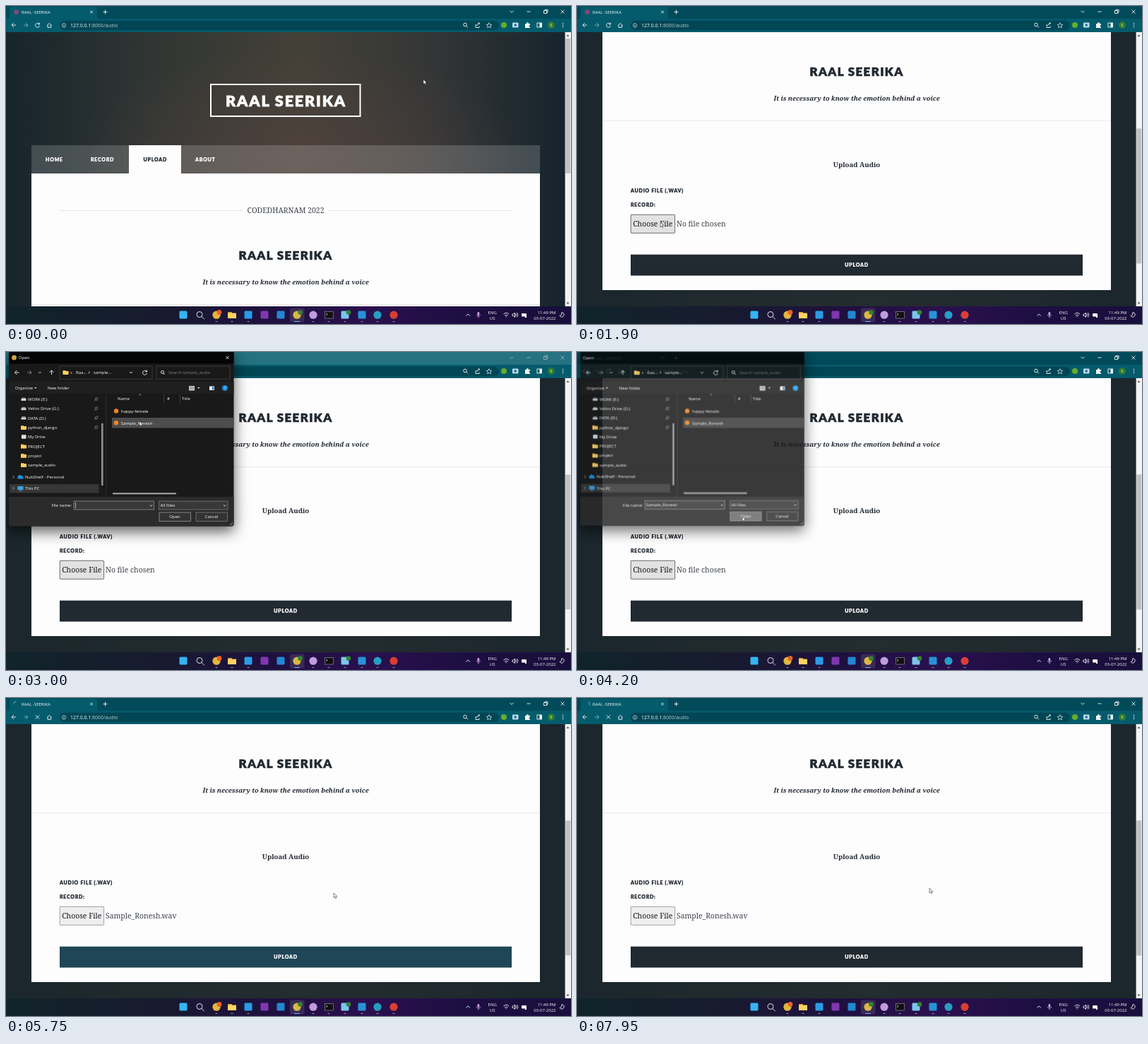
These frames come from a looping animation (800x450 px, 8000 ms). An HTML page:

```html
<!DOCTYPE html>
<html lang="en">
<head>
<meta charset="utf-8">
<title>Audio upload</title>
<style>
html, body { margin: 0; width: 100%; height: 100%; overflow: hidden; background: #1c272d; }
svg { display: block; width: 800px; height: 450px; }
text { white-space: pre; }
.ui { font: 6px "Open Sans", "Noto Sans", sans-serif; fill: #fff; }
.url { font-size: 6.9px; }
.cap, .h0, .h1 { font: 900 7px Lato, sans-serif; fill: #212931; stroke: #212931; stroke-width: .035em; }
.cap { letter-spacing: .75px; }
.h0 { font-size: 21.5px; letter-spacing: 1.9px; }
.h1 { font-size: 16.9px; letter-spacing: 1.4px; }
.white { fill: #fff; stroke: #fff; }
.body { font: 300 10.4px "Noto Serif", serif; fill: #3c434a; }
.bold { font: 700 9.7px "Noto Serif", serif; fill: #212931; }
.slant { font: italic 700 9.22px "Noto Serif", serif; fill: #212931; }
.mid { text-anchor: middle; }
.end { text-anchor: end; }
.line { fill: none; stroke: #f4f8f8; stroke-width: .9; }
.dim { opacity: .45; }
#dialog { transform-origin: 163px 60px; filter: drop-shadow(0 7px 10px rgba(0,0,0,.65)); }
#spinner { transform-origin: 14.5px 8.5px; }
</style>
</head>
<body>
<svg id="stage" viewBox="0 0 800 450"></svg>
<script>
const LOOP = 8000;
const stage = document.getElementById('stage');

const rect = (x, y, w, h, fill, more = '') =>
  `<rect x="${x}" y="${y}" width="${w}" height="${h}" fill="${fill}" ${more}/>`;
const dot = (x, y, r, fill, more = '') =>
  `<circle cx="${x}" cy="${y}" r="${r}" fill="${fill}" ${more}/>`;
const text = (x, y, str, cls = 'ui', more = '') =>
  `<text x="${x}" y="${y}" class="${cls}" ${more}>${str}</text>`;
const path = (d, more = '') => `<path class="line" d="${d}" ${more}/>`;
const group = (id, inner, more = '') => `<g id="${id}" ${more}>${inner}</g>`;
const cross = (x, y, r) => path(`M${x - r} ${y - r}l${2 * r} ${2 * r}m0 ${-2 * r}l${-2 * r} ${2 * r}`);
const chevron = (x, y, r = 2) => path(`M${x - r} ${y - r / 2}l${r} ${r}l${r} ${-r}`);
const arrow = (x, y, dir, more) => path(`M${x - 3} ${y}h6M${x + 3 * dir} ${y}l${-3 * dir} -3m${3 * dir} 3l${-3 * dir} 3`, more);
const lens = (x, y, r) => dot(x, y, r, 'none', 'class="line"') + path(`M${x + r * .7} ${y + r * .7}l${r} ${r}`);
const reload = (x, y) => path(`M${x + 2.5} ${y - 1.5}A3 3 0 1 0 ${x + 3} ${y + 1}M${x + 3} ${y - 3.4}v2.4h-2.4`);
const folder = (x, y, s = 1) =>
  rect(x - 4 * s, y - 3 * s, 4 * s, 3 * s, '#e3a22c', 'rx=".5"') + rect(x - 4 * s, y - 2 * s, 8 * s, 5 * s, '#ffd262', 'rx=".6"');

function background() {
  return `<defs>
    <linearGradient id="base"><stop stop-color="#17242b"/><stop offset=".25" stop-color="#303533"/>
      <stop offset=".52" stop-color="#434037"/><stop offset=".75" stop-color="#343636"/><stop offset="1" stop-color="#15232c"/></linearGradient>
    <radialGradient id="warm" cx=".52" cy=".45" r=".4"><stop stop-color="#54423f" stop-opacity=".65"/>
      <stop offset="1" stop-color="#54423f" stop-opacity="0"/></radialGradient>
    <linearGradient id="bar"><stop stop-color="#10242a"/><stop offset=".25" stop-color="#171b2e"/>
      <stop offset=".48" stop-color="#1f1040"/><stop offset=".64" stop-color="#2a104f"/><stop offset=".82" stop-color="#1d0e41"/><stop offset="1" stop-color="#180f3c"/></linearGradient>
    </defs>` + rect(0, 37, 800, 388, 'url(#base)') + rect(0, 37, 800, 388, 'url(#warm)')
    + group('shade', rect(0, 37, 800, 388, '#1c272d'), 'opacity="0"');
}

function page() {
  return rect(290, 111, 211.5, 45, 'none', 'stroke="#fff" stroke-width="2"')
    + text(396.5, 141.5, 'RAAL SEERIKA', 'h0 mid white')
    + rect(36, 197, 720, 40, '#fff', 'opacity=".175"') + rect(174, 197, 74, 40, '#fefdfe')
    + [[56, 'HOME'], [120, 'RECORD'], [268, 'ABOUT']].map(([x, s]) => text(x, 220, s, 'cap white')).join('')
    + text(194.5, 220, 'UPLOAD', 'cap')
    + rect(36, 237, 720, 425, '#fefdfe')
    + rect(76, 289, 260, .8, '#dcdddf') + rect(456, 289, 260, .8, '#dcdddf')
    + text(396, 292.7, 'CODEDHARNAM 2022', 'body mid')
    + text(396, 358.5, 'RAAL SEERIKA', 'h1 mid')
    + text(396, 393.8, 'It is necessary to know the emotion behind a voice', 'slant mid')
    + rect(36, 422, 720, .8, '#e4e5e6')
    + text(396, 487.5, 'Upload Audio', 'bold mid')
    + text(76, 524.2, 'AUDIO FILE (.WAV)', 'cap') + text(76, 544.2, 'RECORD:', 'cap')
    + rect(76.2, 555.3, 62.4, 26, '#efefef', 'stroke="#8a8a8a" stroke-width=".8" rx=".8" id="choose"')
    + text(107.3, 571.8, 'Choose File', 'body mid', 'style="fill:#15191d"')
    + text(141, 571.8, 'No file chosen', 'body', 'id="nofile"')
    + text(141, 571.8, 'Sample_Ronesh.wav', 'body', 'id="file" opacity="0"')
    + rect(76, 611.7, 640, 29.8, '#212931', 'id="upload"')
    + text(396, 629.2, 'UPLOAD', 'cap mid white');
}

function scrollbar() {
  return rect(791.6, 37, 8.4, 388, '#f3f3f3') + group('thumb', rect(792.2, 46, 7, 191, '#c1c1c1'))
    + '<path d="M793.5 43l2-2.4 2 2.4zM793.5 419.5l2 2.4 2-2.4z" fill="#505050"/>';
}

function browser() {
  const tools = arrow(11, 27, -1) + arrow(28, 27, 1, 'opacity=".5"')
    + group('reload', reload(44.5, 27)) + group('stop', cross(44.5, 27, 2.6), 'opacity="0"')
    + path('M58 27.5l3.3-3 3.3 3M59 27v3.3h4.6v-3.3')
    + dot(82, 27.5, 2.8, 'none', 'class="line" style="stroke-width:.6"') + path('M82 27v2M82 25.5v.6')
    + text(91, 29.8, '127.0.0.1<tspan opacity=".72">:8000/audio</tspan>', 'ui url')
    + lens(650, 26.5, 2.3) + path('M665 26v4.5h5v-2M666.5 28q.5-3.5 4-3.5m-1.5-1.5l1.7 1.5-1.7 1.5')
    + path('M684 23.7l1.1 2.5 2.7.2-2 1.8.6 2.6-2.4-1.4-2.4 1.4.6-2.6-2-1.8 2.7-.2z', 'style="stroke-width:.7"')
    + dot(705, 27, 4, '#69ad28') + rect(717, 23.5, 8.5, 7, '#b9dcef', 'rx="1"') + dot(721.2, 27, 1.8, '#27678a')
    + '<path d="M735 25h2q0-2 1.5-2t1.5 2h2v2q-1.5 0-1.5 1.3t1.5 1.3v1.4h-7z" fill="#f4f8f8"/>'
    + rect(752, 24, 6.5, 6, 'none', 'class="line"') + rect(755.5, 24, 3, 6, '#f4f8f8')
    + dot(772, 27, 5, '#347c27') + text(772, 29, 'S', 'ui mid')
    + [24.5, 27, 29.5].map(y => dot(788.5, y, .7, '#fff')).join('');
  return rect(0, 0, 800, 18.5, '#004a5a', 'id="strip"')
    + rect(0, 18, 800, 19, '#045b6c') + path('M2 18.5Q5 18 5 14V4Q5 1 8 1H126Q129 1 129 4V14Q129 18 132 18.5z', 'style="fill:#045b6c;stroke:none"')
    + dot(14.5, 8.5, 3.6, '#7d4a78', 'id="favicon"')
    + group('spinner', path('M11 8.5A3.5 3.5 0 0 1 14.5 5', 'style="stroke:#7db9d4"'), 'opacity="0"')
    + text(22, 10.8, 'RAAL -SEERIKA') + cross(121, 8.5, 1.8) + path('M137.5 8.5h6m-3-3v6')
    + group('controls', chevron(716, 8, 2.5) + path('M737.5 8h5M761.5 6.5h4v4h-4zM763 6.5v-1.3h4v4h-1.3') + cross(788, 8, 2.4))
    + rect(76, 20.8, 622, 13.4, '#014655', 'rx="6.7"') + tools;
}

function taskbar() {
  const square = (x, fill) => rect(x - 5.5, 431.5, 11, 11, fill, 'rx="1.5"');
  const round = (x, fill) => dot(x, 437.2, 5.6, fill);
  const open = [298, 320, 343, 435, 457, 480, 504, 526, 549];
  return rect(0, 425, 800, 25, 'url(#bar)')
    + rect(402, 427.5, 20.5, 20, '#fff', 'opacity=".11" rx="2"')
    + square(251, '#35b4f2') + lens(274, 436.5, 4) + round(298, '#e5b63d') + dot(302, 433.5, 3.4, '#e8612c')
    + folder(320, 437.5, 1.5) + square(343, '#2b9be6') + square(366, '#8037b0') + square(389, '#2387d1')
    + round(412, '#d9b844') + dot(416.5, 433.5, 3.3, '#348332') + round(435, '#c29adf')
    + rect(451.5, 432.5, 12, 9.5, '#101010', 'stroke="#8a8a94" stroke-width=".7"') + path('M453.5 435l1.5 1.3-1.5 1.3')
    + square(480, '#7cc5ec') + dot(485, 433.5, 3.3, '#348332') + square(504, '#2892d8') + round(526, '#259fc2') + round(549, '#d83e34')
    + open.map(x => rect(x - 1.5, 446, 3, 1, '#a0a0aa', 'rx=".5"')).join('') + rect(408, 446, 8, 1.1, '#69b7ee', 'rx=".5"')
    + path('M651.5 438.5l2.7-2.7 2.7 2.7')
    + rect(667.5, 433, 2.8, 5, '#d0a5d8', 'rx="1.4"') + path('M666 437q3 4.5 6 0M669 439.5v2', 'style="stroke:#d0a5d8"')
    + text(688.7, 435.8, 'ENG', 'ui mid') + text(688.7, 443.8, 'US', 'ui mid')
    + path('M704.5 436q3.8-3.5 7.6 0M706 438q2.3-2 4.6 0M707.5 439.7q.8-.6 1.6 0')
    + path('M717 436h1.5l2-2v6.5l-2-2h-1.5zM722 435.5q1.3 1.7 0 3.4M723.5 434q2.6 3.2 0 6.4')
    + rect(730, 435, 7, 4.5, '#fff', 'rx="1"') + rect(735, 438, 2, 3, '#fff')
    + text(778.5, 435.8, '11:49 PM', 'ui end') + text(778.5, 443.8, '03-07-2022', 'ui end')
    + path('M787 433.5a3.3 3.3 0 1 1-3 5q3.5-.5 3-5z');
}

function dialog() {
  const side = ['WORK (E:)', 'Veltro Drive (G:)', 'DATA (D:)', 'python_django', 'My Drive', 'PROJECT', 'project', 'sample_audio'];
  const rows = side.map((label, i) => {
    const y = 67 + i * 13.3;
    const icon = i < 3 ? rect(21.5, y - 1, 7, 3, '#d4d8dc', 'rx=".5"') + rect(22.5, y - 2.5, 5, 1.5, '#8d959b')
      : i === 4 ? rect(22, y - 3, 6.5, 5.5, '#d8e2ea') : folder(25, y);
    const pin = i < 4 ? path(`M125 ${y + 2.5}l1.8-1.8m-1-1.5l2.5 2.5 1.8-3-1.5-1.5z`, 'style="stroke:#c5c5c5;stroke-width:.6"') : '';
    return icon + text(31, y + 2.1, label) + pin;
  }).join('');
  const box = (x, y, w, h, fill, edge) => rect(x, y, w, h, fill, `stroke="${edge}" stroke-width=".7"`);
  return rect(4, -3, 318.5, 249.5, '#191919', 'rx="3"') + rect(4, 0, 318.5, 16.5, '#050505')
    + rect(4, 42, 318.5, 17, '#1f1f1f')
    + group('badges', dot(11.5, 8, 3.4, '#d0aa42') + cross(313.5, 8, 2)) + text(18, 10.2, 'Open', 'ui', 'id="caption"')
    + arrow(15.5, 29, -1) + arrow(33, 29, 1, 'opacity=".5"') + chevron(48, 29, 1.6) + path('M64.5 32v-6m-3 3l3-3 3 3')
    + box(76, 20, 131, 18.5, '#191919', '#484848') + folder(84.5, 29) + text(91, 31, '«')
    + text(99, 31, 'Raa...') + path('M117 27.5l1.5 1.5-1.5 1.5') + text(124, 31, 'sample...')
    + chevron(177, 29) + reload(196.5, 29)
    + box(213, 20, 104, 18.5, '#191919', '#484848') + lens(221.5, 28.5, 2) + text(230, 31, 'Search sample_audio', 'ui dim')
    + text(13, 53.2, 'Organize') + '<path d="M40 50l1.8 2 1.8-2z" fill="#ddd"/>' + text(59, 53.2, 'New folder')
    + rect(259, 48, 8, 6.5, '#ccc') + path('M260 50h6m-6 2h6', 'style="stroke:#444;stroke-width:.6"')
    + '<path d="M271 50l1.8 2 1.8-2z" fill="#ddd"/>'
    + rect(288, 48.5, 7, 5.5, '#eee') + rect(292, 49.3, 2.4, 4, '#257fc2')
    + dot(310, 51, 4, '#168ed9') + text(310, 53.1, '?', 'ui mid')
    + rect(5, 187, 126.5, 12.5, '#363636') + rows
    + path('M9.5 175l2 2-2 2M9.5 191l2 2-2 2', 'opacity=".6"')
    + '<path d="M18 179.5q-3-1-1-3.5 1-3 4-1.5 3 .5 3 2.5 1.5 2-.5 2.5z" fill="#1f91df"/>' + text(27, 179.1, 'NubShelf - Personal')
    + rect(16.5, 190, 8, 5.2, '#37a6e8') + rect(19, 196, 3, .8, '#aaa') + text(27, 195.3, 'This PC')
    + rect(135, 101, 2.6, 88, '#8f8f8f') + rect(141.5, 60, .7, 145, '#393939')
    + path('M188.5 61.2l1.5-1.5 1.5 1.5', 'style="stroke-width:.6"')
    + text(158, 68.2, 'Name') + text(228, 68.2, '#') + text(249, 68.2, 'Title')
    + rect(223, 60, .6, 12, '#555') + rect(246, 60, .6, 12, '#555')
    + rect(150, 93, 172.5, 14.5, '#4d4d4d', 'id="row" opacity="0"')
    + dot(156, 83.5, 3.2, '#ee8322') + text(163, 86, 'happy-female')
    + dot(156, 100.2, 3.2, '#ee8322') + text(163, 102.7, 'Sample_Ronesh')
    + rect(151, 199.2, 90, 2.2, '#a0a0a0')
    + '<path d="M4 205h318.5v38.5q0 3-3 3H7q-3 0-3-3z" fill="#2b2b2b"/>'
    + text(93, 219.3, 'File name:', 'ui end') + box(96, 211, 113.5, 12, '#383838', '#999') + chevron(205.5, 217.3, 1.6)
    + rect(98, 213, .6, 8, '#fff', 'id="caret"') + text(97.5, 219.3, 'Sample_Ronesh', 'ui', 'id="chosen" opacity="0"')
    + box(216.5, 211, 97.5, 12, '#383838', '#808080') + text(218.5, 219.3, 'All Files') + chevron(309.5, 217.3, 1.6)
    + rect(217, 227, 44.5, 12.5, '#333', 'stroke="#aaa" stroke-width=".7" id="open"') + text(239, 235.4, 'Open', 'ui mid')
    + box(269, 227, 44.5, 12.5, '#333', '#888') + text(291, 235.4, 'Cancel', 'ui mid')
    + path('M317 245l4-4m-2 4l2-2', 'opacity=".5"');
}

const pointer = '<path d="M0 0V6.6L1.6 5.2 2.7 7.6 3.8 7.1 2.7 4.8H4.8Z" fill="#fff" stroke="#222" stroke-width=".55"/>';

stage.innerHTML = background() + group('page', page()) + scrollbar() + browser() + taskbar()
  + group('dialog', dialog(), 'opacity="0"') + group('cursor', pointer);

// Each step is [ms, value]; the easing runs from one step to the next.
function track(id, prop, steps, easing = 'linear') {
  const full = [...steps, [LOOP, steps[steps.length - 1][1]]];
  if (full[0][0] > 0) full.unshift([0, full[0][1]]);
  document.getElementById(id).animate(
    full.map(([ms, value]) => ({ offset: ms / LOOP, [prop]: value, easing })),
    { duration: LOOP, iterations: Infinity });
}
const jump = (id, prop, steps) => track(id, prop, steps, 'steps(1, end)');
const move = (x, y) => `translate(${x}px, ${y}px)`;

const OPEN = 2250, PICK = 3400, CLOSE = 4150, SEND = 5450;

const scroll = [[180, 0], [800, 220], [920, 260]];
track('page', 'transform', scroll.map(([ms, y]) => [ms, move(0, -y)]));
track('thumb', 'transform', scroll.map(([ms, y]) => [ms, move(0, y * .49)]));
track('shade', 'opacity', scroll.map(([ms, y]) => [ms, y / 325]));

track('cursor', 'transform', [
  [0, 591, 104], [1000, 591, 104], [1600, 118, 306], [2450, 118, 306], [2950, 189, 98], [3550, 189, 98],
  [4000, 234, 233], [4400, 234, 233], [5050, 455, 367], [5550, 455, 367], [5750, 464, 276],
  [6000, 464, 276], [6600, 499, 269]
].map(([ms, x, y]) => [ms, move(x, y)]), 'ease-in-out');

jump('choose', 'fill', [[0, '#efefef'], [1550, '#e2e2e2'], [4500, '#efefef']]);
jump('choose', 'stroke', [[0, '#8a8a8a'], [1550, '#4c4c4c'], [4500, '#8a8a8a']]);

track('dialog', 'opacity', [[0, 0], [OPEN, 0], [OPEN + 150, 1], [CLOSE, 1], [CLOSE + 50, .87], [CLOSE + 150, 0]]);
track('dialog', 'transform', [[0, 'scale(.95)'], [OPEN, 'scale(.95)'], [OPEN + 150, 'scale(1)'],
  [CLOSE, 'scale(1)'], [CLOSE + 50, 'scale(.996)'], [CLOSE + 150, 'scale(.95)']]);
jump('badges', 'opacity', [[0, 1], [CLOSE, 0]]);
jump('caption', 'transform', [[0, move(0, 0)], [CLOSE, move(-10.5, 0)]]);
jump('strip', 'fill', [[0, '#004a5a'], [OPEN, '#267280'], [CLOSE, '#004a5a']]);
jump('controls', 'opacity', [[0, 1], [OPEN, .5], [CLOSE, 1]]);
jump('row', 'opacity', [[0, 0], [2900, 1], [3650, .7]]);
jump('caret', 'opacity', [[0, 1], [PICK, 0]]);
jump('chosen', 'opacity', [[0, 0], [PICK, 1]]);
jump('open', 'fill', [[0, '#333'], [3950, '#6a6a6a']]);
jump('nofile', 'opacity', [[0, 1], [4250, 0]]);
jump('file', 'opacity', [[0, 0], [4250, 1]]);

track('upload', 'fill', [[0, '#212931'], [4950, '#212931'], [5150, '#18bfef'], [5650, '#18bfef'], [5850, '#212931']], 'ease');
jump('reload', 'opacity', [[0, 1], [SEND, 0]]);
jump('stop', 'opacity', [[0, 0], [SEND, 1]]);
jump('favicon', 'opacity', [[0, 1], [SEND, 0]]);
jump('spinner', 'opacity', [[0, 0], [SEND, 1]]);
const turn = ms => `rotate(${(5750 - ms) / 1320 * 360}deg)`;
track('spinner', 'transform', [[0, turn(0)], [LOOP - 1, turn(LOOP - 1)]]);
</script>
</body>
</html>
```
